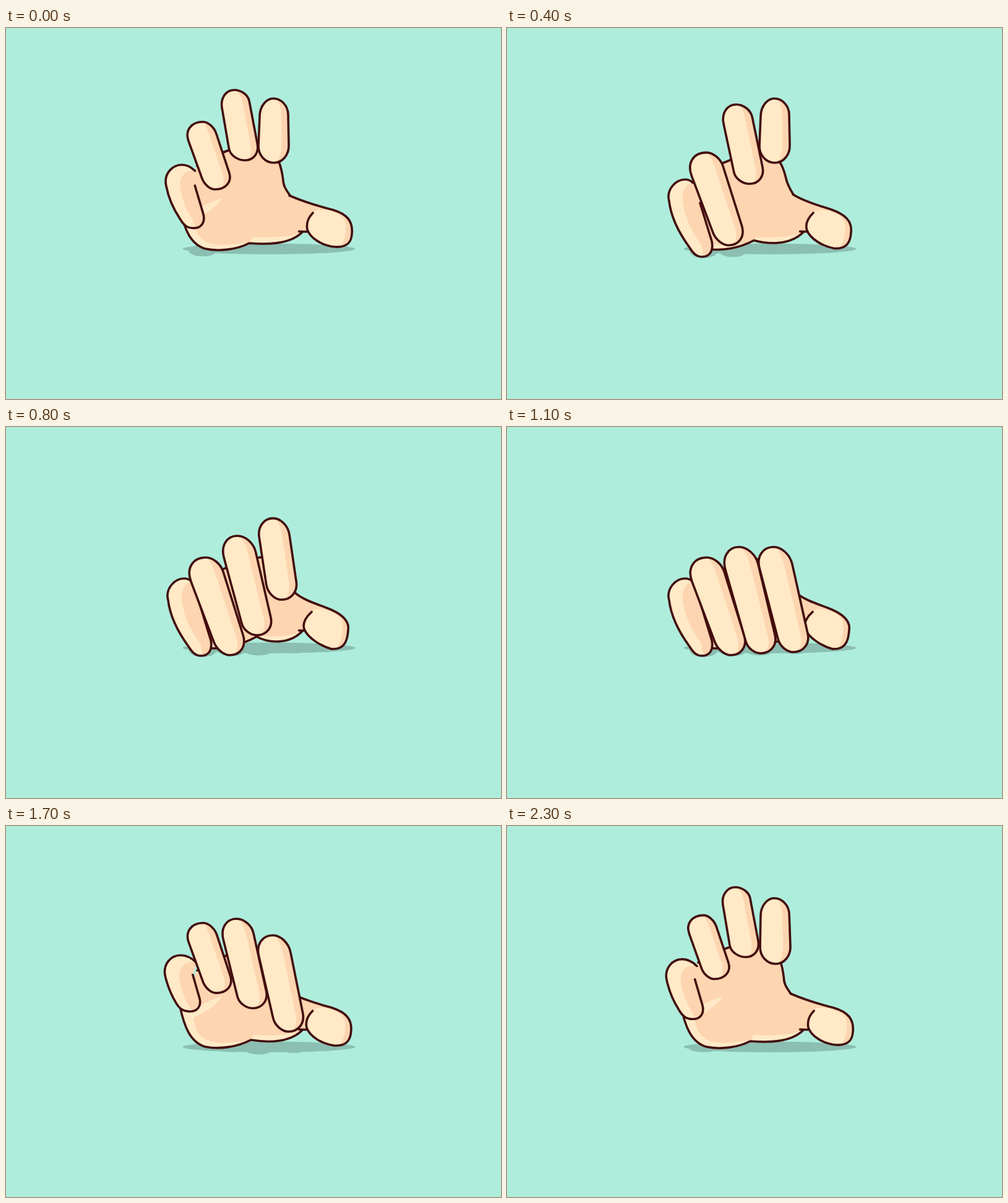
These frames come from a looping animation (800 by 600 pixels, 2.4 s). An HTML page:

```html
<!DOCTYPE html>
<html lang="en">
<head>
<meta charset="utf-8">
<title>Drumming fingers</title>
<style>
  html, body { margin: 0; width: 100%; height: 100%; overflow: hidden; background: #aeeddc; }
  svg { display: block; width: 100%; height: 100%; }
  .shadow { fill: #8bbfb1; }
  .light { fill: #ffe9c6; }
  .shade { fill: #fdd5b0; }
  .line { fill: none; stroke: #430d0e; stroke-width: 3.6; stroke-linecap: round; stroke-linejoin: round; }
</style>
</head>
<body>
<svg id="stage" viewBox="0 0 800 600"></svg>
<script>
const LOOP = 2400, STEP = 100;
const stage = document.getElementById('stage');

function add(tag, cls, attrs = {}) {
  const node = document.createElementNS('http://www.w3.org/2000/svg', tag);
  node.setAttribute('class', cls);
  for (const key in attrs) node.setAttribute(key, attrs[key]);
  return stage.appendChild(node);
}
const setPath = (node, d) => node.setAttribute('d', d);

// Smooth cyclic curve through { time: value } that never overshoots its keys.
function track(keys) {
  const times = Object.keys(keys).map(Number), n = times.length;
  const time = i => times[(i + n) % n] + Math.floor(i / n) * LOOP;
  const value = i => keys[times[(i + n) % n]];
  const slope = i => (value(i + 1) - value(i)) / (time(i + 1) - time(i));
  const tangent = i => {
    const a = slope(i - 1), b = slope(i);
    return a * b > 0 ? 2 * a * b / (a + b) : 0;
  };
  return t => {
    let i = n - 1;
    while (time(i) > t) i--;
    const h = time(i + 1) - time(i), s = (t - time(i)) / h, r = 1 - s;
    return value(i) * (1 + 2 * s) * r * r + value(i + 1) * s * s * (3 - 2 * s)
      + h * (tangent(i) * s * r * r - tangent((i + 1) % n) * s * s * r);
  };
}

const mix = (a, b, u) => a + (b - a) * u;
const mixPoint = (p, q, u) => [mix(p[0], q[0], u), mix(p[1], q[1], u)];

// Blends two path strings that share the same commands.
function morph(from, to, u) {
  const ends = to.match(/[\d.]+/g);
  let i = 0;
  return from.replace(/[\d.]+/g, v => mix(+v, +ends[i++], u).toFixed(2));
}

// 0 is fully raised, 1 is resting on the table.
const curl = {
  pinky: track({ 0: .39, 300: .95, 400: 1, 1200: 1, 1500: .26, 1900: 0, 2300: .24 }),
  ring: track({ 0: .2, 400: .87, 600: 1, 1200: 1, 1500: .65, 1900: .007, 2000: 0, 2300: .1 }),
  middle: track({ 0: .013, 400: .26, 800: .81, 1000: 1, 1300: 1, 1500: .95, 1800: .3, 1900: .15, 2200: 0, 2300: 0 }),
  index: track({ 0: 0, 500: 0, 600: .12, 800: .42, 1100: 1, 1500: 1, 1900: .45, 2300: .034 }),
  thumb: track({ 0: 0, 400: .5, 700: 1, 1200: 1, 1500: .5, 1900: .03, 2000: 0 })
};

// Points: left shoulder, top, right shoulder, lower right, bottom, lower left.
const fingers = {
  ring: {
    up: [[294, 166], [317, 137], [337, 155], [355, 208], [332, 234], [312, 217]],
    down: [[299, 250], [323, 211], [351, 234], [383, 336], [362, 369], [336, 348]]
  },
  middle: {
    up: [[349, 128], [369, 99], [393, 117], [406, 186], [386, 212], [360, 193]],
    down: [[353, 231], [375, 194], [406, 222], [433, 336], [410, 366], [386, 347]]
  },
  index: {
    up: [[410, 142], [432, 114], [456, 140], [457, 190], [433, 218], [408, 190]],
    down: [[408, 228], [431, 194], [461, 222], [486, 334], [463, 364], [438, 343]]
  }
};

const pinky = {
  outline: [
    'M309,219 C300,210 291,206 282,206 C264,206 253,222 257,240 Q263,263 273,280 C278,289 284,294 296,294 C308,294 315,285 311,272 L301,237',
    'M300,250 C297,247 293,245 288,245 C272,245 257,262 262,280 Q266,315 295,355 C302,366 307,370 315,370 C328,370 334,360 331,345 L312,283'],
  shade: [
    'M309,219 C290,212 278,228 280,242 Q282,262 294,286 L300,293 C308,293 315,285 311,272 L301,237Z',
    'M300,250 C290,252 283,262 284,280 Q288,315 314,350 L318,369 C328,370 334,360 331,345 L312,283Z']
};

const palm = {
  bottom: [
    'M281,291 C288,325 298,350 322,357 C345,362 374,358 393,348 C420,350 458,351 479,330',
    'M281,291 C288,325 298,350 322,357 C348,361 380,353 405,339 C425,350 458,352 479,330'],
  top: [
    'M458,271 C450,260 447,255 447,245 C446,235 444,225 441,216 C432,188 395,186 361,194 C350,196 325,210 309,219',
    'M466,267 C459,255 456,245 453,238 C450,230 446,222 440,216 C430,210 395,210 362,228 C345,236 325,245 309,255'],
  heel: 'M281,291 C288,325 298,350 322,357 C345,362 374,358 393,347 L375,349 C345,352 308,356 303,310 C325,300 340,290 349,275 C335,280 318,288 312,290Z',
  base: [
    'M393,348 C420,350 458,351 479,330 C455,341 420,338 398,338Z',
    'M405,339 C425,350 458,352 479,330 C455,341 430,338 405,339Z']
};

const thumb = {
  outline: [
    'M458,271 C472,277 500,287 528,294 C551,301 561,312 559,333 C558,348 550,355 532,354 C512,352 492,341 487,326 C485,316 488,307 496,299',
    'M466,267 C476,277 495,284 517,292 C544,302 555,314 553,328 C552,350 544,360 526,359 C508,354 488,341 482,327 C479,318 483,309 494,299'],
  light: [
    'M496,299 C500,288 548,295 549,318 C551,335 545,348 540,353 C515,355 490,342 487,326 C485,316 488,307 496,299Z',
    'M494,299 C500,288 543,298 544,320 C544,340 540,352 534,358 C508,356 486,342 482,327 C479,318 483,309 494,299Z']
};

// Where the line through two points reaches height y.
const reach = (a, b, y) => [b[0] + (b[0] - a[0]) * (y - b[1]) / (b[1] - a[1]), y];

function cap(from, corner, to) {
  return 'C' + [mixPoint(from, corner, .55), mixPoint(to, corner, .55), to].join(' ');
}

function fingerPath([left, top, right, lowRight, bottom, lowLeft]) {
  return `M${left}` + cap(left, reach(lowLeft, left, top[1]), top)
    + cap(top, reach(lowRight, right, top[1]), right)
    + `L${lowRight}` + cap(lowRight, reach(right, lowRight, bottom[1]), bottom)
    + cap(bottom, reach(left, lowLeft, bottom[1]), lowLeft) + 'Z';
}

function fingerShade([left, top, right, lowRight, bottom, lowLeft]) {
  const upper = mixPoint(right, left, .24), lower = mixPoint(lowRight, lowLeft, .24);
  return `M${top}` + cap(top, reach(lowRight, right, top[1]), right)
    + `L${lowRight}` + cap(lowRight, reach(right, lowRight, bottom[1]), bottom)
    + cap(bottom, reach(upper, lower, bottom[1]), lower)
    + `L${upper}` + cap(upper, reach(lower, upper, top[1]), top) + 'Z';
}

// Layers, back to front.
add('ellipse', 'shadow', { cx: 425, cy: 357.3, rx: 139.5, ry: 8.6 });
const bumps = [['pinky', 318, 12], ['ring', 365, 10.5], ['middle', 408, 9.5], ['index', 465, 7]]
  .map(([name, cx, size]) => ({ name, size, node: add('ellipse', 'shadow', { cx, cy: 360, rx: 23 }) }));

const palmFill = add('path', 'shade');
add('path', 'light', { d: palm.heel });
const palmBase = add('path', 'light');
const palmBottom = add('path', 'line');
const palmTop = add('path', 'line');
add('path', 'line', { d: 'M473.5,329 L486,329.5' });

const thumbFill = add('path', 'shade');
const thumbLight = add('path', 'light');
const thumbLine = add('path', 'line');

const addFinger = () => ({ fill: add('path', 'light'), shade: add('path', 'shade'), line: add('path', 'line') });
const pinkyNodes = addFinger();
for (const name in fingers) fingers[name].nodes = addFinger();

function paintFinger(nodes, outline, shade) {
  setPath(nodes.fill, outline);
  setPath(nodes.shade, shade);
  setPath(nodes.line, outline);
}

function render(t) {
  const u = {};
  for (const name in curl) u[name] = curl[name](t);

  for (const { name, size, node } of bumps) {
    node.setAttribute('ry', size * Math.min(1, 2 * Math.max(0, u[name])));
  }

  const top = morph(...palm.top, (u.ring + u.middle) / 2);
  const bottom = morph(...palm.bottom, u.thumb);
  setPath(palmFill, bottom + 'L500,330 L500,290' + top.replace('M', 'L') + 'Z');
  setPath(palmBase, morph(...palm.base, u.thumb));
  setPath(palmBottom, bottom);
  setPath(palmTop, top);

  const thumbOutline = morph(...thumb.outline, u.thumb);
  setPath(thumbFill, thumbOutline);
  setPath(thumbLight, morph(...thumb.light, u.thumb));
  setPath(thumbLine, thumbOutline);

  paintFinger(pinkyNodes, morph(...pinky.outline, u.pinky), morph(...pinky.shade, u.pinky));
  for (const name in fingers) {
    const { up, down, nodes } = fingers[name];
    const points = up.map((p, i) => mixPoint(p, down[i], u[name]));
    paintFinger(nodes, fingerPath(points), fingerShade(points));
  }
}

const start = performance.now();
function tick() {
  const t = (performance.now() - start) % LOOP;
  render(Math.floor(t / STEP) * STEP);
  requestAnimationFrame(tick);
}
tick();
</script>
</body>
</html>
```
